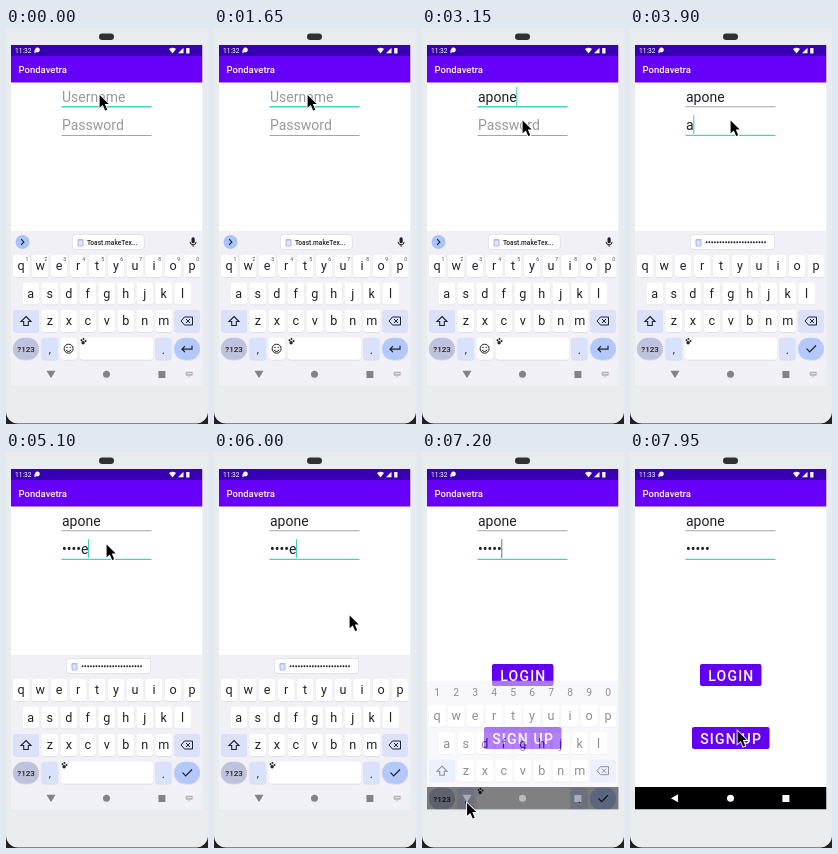
These frames come from a looping animation (202 by 396 pixels, 8 s). An HTML page with a canvas:

```html
<!DOCTYPE html>
<html lang="en">
<head>
<meta charset="utf-8">
<title>Login form on a phone</title>
<style>
html, body { margin: 0; width: 100%; height: 100%; overflow: hidden; background: #222; }
canvas { display: block; width: 202px; height: 396px; }
</style>
</head>
<body>
<canvas id="stage"></canvas>
<script>
const W = 202, H = 396, LOOP = 8000, STEP = 150;
const PURPLE = '#6400f2', TEAL = '#45d2c6', INK = '#202124', PALE = '#dae2fb', NAV = '#828287';
const NAME = 'apone';
const nameTimes = [1800, 1950, 2100, 2400, 2700];
const passTimes = [3900, 4200, 4500, 4800, 5100];
const caretToggles = [150, 750, 1200, 1650, 1800, 3750, 3900, 5550, 6000, 6450, 6900, 7500];
// time, x, y of the pointer tip
const pointerPath = [
  [0, 92.5, 65.5], [2700, 92.5, 65.5], [3150, 99.5, 91], [5700, 99.5, 91], [6000, 134.5, 162],
  [6150, 126, 215], [6300, 103, 275], [6450, 76, 318], [6600, 55, 344], [6750, 47, 349],
  [6900, 44, 349.5], [7350, 44, 349.5], [7500, 52, 337], [7800, 89, 297], [7950, 106.5, 277.5]
];

const scale = window.devicePixelRatio || 1;
const canvas = document.getElementById('stage');
const layer = document.createElement('canvas');
for (const c of [canvas, layer]) {
  c.width = W * scale;
  c.height = H * scale;
}
let ctx = canvas.getContext('2d');

function box(x, y, w, h, color, r = 0) {
  ctx.fillStyle = color;
  ctx.beginPath();
  ctx.roundRect(x, y, w, h, r);
  ctx.fill();
}

function dot(x, y, r, color) {
  ctx.fillStyle = color;
  ctx.beginPath();
  ctx.arc(x, y, r, 0, 7);
  ctx.fill();
}

function text(str, x, y, size, color, { align = 'left', weight = 400, spacing = 0 } = {}) {
  ctx.font = `${weight} ${size}px Roboto, sans-serif`;
  ctx.textAlign = align;
  ctx.letterSpacing = spacing + 'px';
  ctx.fillStyle = color;
  ctx.fillText(str, x, y);
  return ctx.measureText(str).width;
}

function fillPath(d, x, y, color) {
  ctx.save();
  ctx.translate(x, y);
  ctx.fillStyle = color;
  ctx.fill(new Path2D(d));
  ctx.restore();
}

function strokePath(d, x, y, color = INK, width = 1.1) {
  ctx.save();
  ctx.translate(x, y);
  ctx.strokeStyle = color;
  ctx.lineWidth = width;
  ctx.stroke(new Path2D(d));
  ctx.restore();
}

const countPassed = (times, t) => times.filter(time => time <= t).length;

function pointerAt(t) {
  const i = pointerPath.findIndex(p => p[0] > t);
  if (i < 0) return pointerPath.at(-1).slice(1);
  const [t0, x0, y0] = pointerPath[i - 1], [t1, x1, y1] = pointerPath[i];
  const k = (t - t0) / (t1 - t0);
  return [x0 + (x1 - x0) * k, y0 + (y1 - y0) * k];
}

function drawBody() {
  box(0, 0, W, H, '#222');
  box(0, -20, W, 415.5, '#e9ecee', 12);
  box(93, 5.5, 15, 6.5, '#303134', 3.2);
}

function drawBars(t) {
  box(5, 17, 191.5, 318, '#fff');
  box(5, 17, 191.5, 11, '#3700b3');
  box(5, 28, 191.5, 26.4, '#6700f8');
  text(t < 7500 ? '11:32' : '11:33', 9, 25, 6.6, '#fff');
  dot(31.4, 22, 2.4, '#fff');
  fillPath('M0 0V3.5L3 1Z', 28.5, 22, '#fff');
  fillPath('M0 1.5Q3.5 -1.2 7 1.5L3.5 6Z', 163, 19.5, '#fff');
  fillPath('M0 5.5H5.5V0Z', 172, 19.8, '#fff');
  box(180.2, 20, 3.3, 5.5, '#fff', 0.5);
  text('Pondavetra', 12.5, 45, 9.5, '#fff', { weight: 500 });
}

function drawField(value, hint, baseline, lineY, focused, t) {
  if (!value) text(hint, 56, baseline, 14, '#999');
  const width = value ? text(value, 56, baseline, 14, INK) : 0;
  box(55.5, focused ? lineY - 0.2 : lineY, 90, focused ? 1.3 : 0.9, focused ? TEAL : '#a5a5a5');
  if (focused && countPassed(caretToggles, t) % 2)
    box(55.6 + width, baseline - 15, 1.1, 19, t < 6900 ? TEAL : '#6f8c8c');
}

function drawForm(t) {
  const onPassword = t >= 3300;
  const typed = countPassed(passTimes, t);
  const password = t >= 6600 ? '•'.repeat(5)
    : typed ? '•'.repeat(typed - 1) + NAME[typed - 1] : '';
  drawField(NAME.slice(0, countPassed(nameTimes, t)), 'Username', 74, 78.3, !onPassword, t);
  drawField(password, 'Password', 102, 107, onPassword, t);
}

function drawButton(label, x, y, w) {
  box(x, y, w, 22, PURPLE, 2);
  text(label, x + 8.2, y + 16.6, 14, '#fff', { weight: 500, spacing: 1.2 });
}

function drawNavIcons(color, back) {
  fillPath(back ? 'M-4 0L3 -4V4Z' : 'M-4.5 -3.5H4.5L0 4Z', 45, 346.2, color);
  dot(100.5, 346.3, 3.5, color);
  box(152.4, 342.9, 7, 7, color);
}

function key(x, y, w, color = '#fff', r = 3) {
  box(x, y + 0.7, w, 22, '#dcdce3', r);
  box(x, y, w, 22, color, r);
}

function keyRow(letters, firstX, y, withDigits) {
  [...letters].forEach((letter, i) => {
    const x = firstX + i * 18.98;
    key(x - 8.3, y, 16.6);
    text(letter, x, y + 15.3, 12.6, INK, { align: 'center' });
    if (withDigits) text((i + 1) % 10, x + 5.6, y + 6, 5, '#444', { align: 'center' });
  });
}

function drawChip(x, w, label) {
  box(x, 206.5, w, 15, '#d6d7de', 3.5);
  box(x + 0.6, 207.1, w - 1.2, 13.8, '#fff', 3);
  box(x + 5.5, 211, 6, 7.5, '#aab7ef', 1);
  box(x + 6.6, 212.4, 3.8, 5, '#dfe5ff');
  text(label, x + 15, 217, 6.6, INK, { weight: 500 });
}

function drawStrip(onPassword, closing) {
  if (closing) {
    for (let i = 0; i < 10; i++)
      text((i + 1) % 10, 15.2 + i * 18.98, 218.7, 10.3, INK, { align: 'center' });
  } else if (onPassword) {
    drawChip(60, 85, '');
    for (let i = 0; i < 22; i++) dot(76.6 + i * 2.78, 214.3, 0.95, INK);
  } else {
    dot(16.5, 214, 7, '#aac4fb');
    strokePath('M-1.4 -2.8L1.4 0L-1.4 2.8', 16.5, 214);
    drawChip(66, 72.5, 'Toast.makeTex...');
    box(185.5, 209.3, 3.2, 6, INK, 1.6);
    strokePath('M-3 0A3 3 0 0 0 3 0M0 3V5', 187.1, 213.8, INK, 1);
  }
}

function drawKeyboard(t, closing) {
  const onPassword = t >= 3300;
  box(5, 203, 191.5, 154.5, '#f1f0f7');
  drawStrip(onPassword, closing);
  keyRow('qwertyuiop', 15.2, 227, !onPassword);
  keyRow('asdfghjkl', 24.8, 254.5);
  keyRow('zxcvbnm', 43.8, 282);

  key(7, 282, 26, PALE);
  strokePath('M0 -5L5 0H2.3V4H-2.3V0H-5Z', 20, 293.5);
  key(168, 282, 26, PALE);
  strokePath('M-6 0L-2.5 -4H5.5V4H-2.5ZM-1 -2L3 2M3 -2L-1 2', 181, 293, INK, 1);

  key(7, 309.7, 26, '#bcc3da', 11);
  text('?123', 20, 324, 8, INK, { align: 'center', weight: 500 });
  key(35.5, 309.7, 16.6, PALE);
  text(',', 43.8, 324.5, 11, INK, { align: 'center' });
  const spaceX = onPassword ? 54.5 : 73.5;
  key(spaceX, 309.7, 147 - spaceX);
  [[2, 2.6], [4, 1.4], [6, 3.2]].forEach(([x, y]) => dot(spaceX + x, 309.7 + y, 1, INK));
  dot(spaceX + 3.6, 314.8, 1.7, INK);
  if (!onPassword) {
    key(54.5, 309.7, 16.6);
    strokePath('M4.5 0A4.5 4.5 0 1 1 -4.5 0A4.5 4.5 0 1 1 4.5 0M-2.4 1A2.5 2.5 0 0 0 2.4 1', 62.6, 320.7, INK, 1);
    dot(61, 319.4, 0.7, INK);
    dot(64.2, 319.4, 0.7, INK);
  }
  key(149, 309.7, 16.6, PALE);
  text('.', 157.3, 325.5, 12, INK, { align: 'center' });
  key(168, 309.7, 26, '#b3c9fc', 11);
  strokePath(onPassword ? 'M-4.5 0L-1.3 3.2L5 -3.2' : 'M5 -3V0.5H-5M-2 -2.5L-5 0.5L-2 3.5', 181, 320.7, INK, 1.2);

  if (closing) return;
  if (t >= 7050) box(36.5, 335.5, 17, 21.5, '#d3d3d9', 8.5);
  drawNavIcons(NAV, false);
  box(179.7, 343.8, 7, 4, '#b4b4ba', 0.7);
  box(181, 345, 4.4, 0.7, '#f1f0f7');
  fillPath('M-1.2 0H1.2L0 1.3Z', 183.2, 348.5, '#b4b4ba');
}

// Composed on its own layer so that the keyboard fades as one sheet
function drawClosingKeyboard(t) {
  const screen = ctx;
  ctx = layer.getContext('2d');
  ctx.setTransform(scale, 0, 0, scale, 0, 25.7 * scale);
  drawKeyboard(t, true);
  ctx = screen;
  ctx.globalAlpha = 0.5;
  ctx.drawImage(layer, 0, 0, W, H);
  ctx.globalAlpha = 1;
}

function drawPointer([x, y]) {
  const arrow = 'M1.1 1.6V14.2L4.3 11.4L6.7 17L8.7 16.2L6.3 10.6H10.2Z';
  strokePath(arrow, x, y, '#fff', 1.8);
  fillPath(arrow, x, y, '#000');
}

function draw(t) {
  ctx.setTransform(scale, 0, 0, scale, 0, 0);
  drawBody();
  ctx.save();
  ctx.beginPath();
  ctx.rect(5, 17, 191.5, 340.5);
  ctx.clip();
  drawBars(t);
  drawForm(t);
  if (t < 7200) {
    drawKeyboard(t, false);
  } else {
    const closing = t < 7350;
    drawButton('LOGIN', 70, 212, 61.5);
    drawButton('SIGN UP', 62, 275, 77.5);
    box(5, 335, 191.5, 22.5, '#000');
    drawNavIcons(closing ? '#777' : '#fff', !closing);
    if (closing) drawClosingKeyboard(t);
  }
  ctx.restore();
  drawPointer(pointerAt(t));
}

function tick() {
  const t = performance.now() % LOOP;
  draw(Math.floor(t / STEP) * STEP);
  requestAnimationFrame(tick);
}
tick();
</script>
</body>
</html>
```
